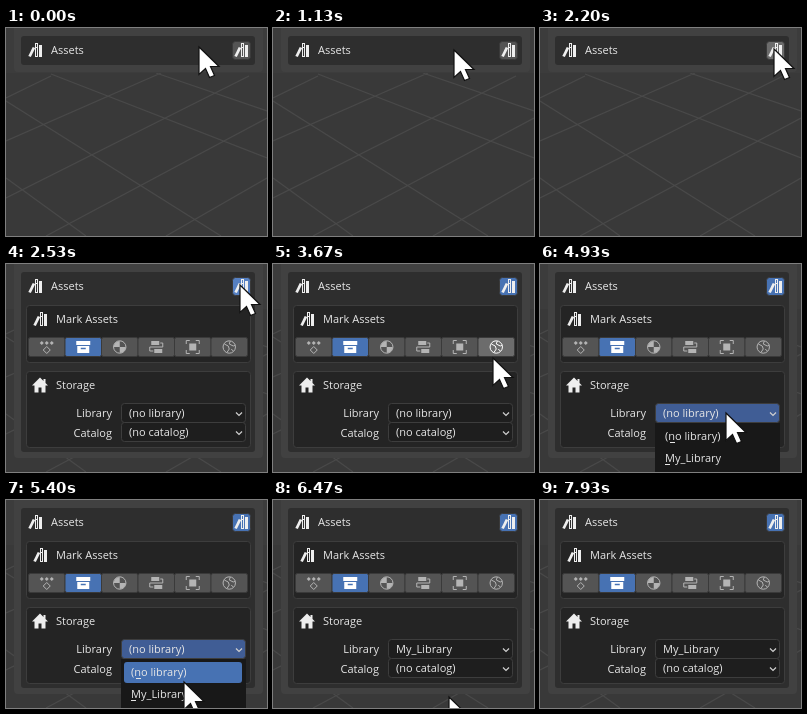
These frames come from a looping animation (261 by 208 pixels, 8.6 s). An HTML page:

```html
<!DOCTYPE html>
<html lang="en">
<head>
<meta charset="utf-8">
<title>Assets panel</title>
<style>
  html, body { margin: 0; width: 100%; height: 100%; overflow: hidden; background: #393939; }
  svg { display: block; width: 100vw; height: 100vh; }
  text { font: 11px "Open Sans", "Noto Sans", sans-serif; fill: #e6e6e6; }
  .end { text-anchor: end; }
  .grid { stroke: #494949; stroke-width: 1.2; fill: none; }
  .box { fill: #242424; stroke: #3d3d3d; }
  .field { fill: #1e1e1e; stroke: #3d3d3d; }
  .field.hover { fill: #282828; }
  .field.open { fill: #405d95; }
  .picked { fill: #4772b3; }
  .button { fill: #545454; stroke: #3a3a3a; }
  .button.hover { fill: #6c6c6c; }
  .button.on { fill: #4772b3; }
  .button.on.hover { fill: #5680c2; }
  .icon { fill: none; stroke: #b4b4b4; }
  .icon .solid { fill: #b4b4b4; stroke: none; }
  .icon.lit { stroke: #fff; }
  .icon.lit .solid { fill: #fff; }
  .chevron { fill: none; stroke: #d0d0d0; stroke-width: 1.2; }
</style>
</head>
<body>
<svg viewBox="0 0 261 208" xmlns="http://www.w3.org/2000/svg">
  <defs>
    <g id="books">
      <path d="M1.6 13.5 6 4.5" stroke="#eee" stroke-width="2.8"/>
      <rect x="7.5" y=".5" width="2" height="13" fill="none" stroke="#eee"/>
      <path d="M7 4.5h3" stroke="#eee"/>
      <rect x="11" y="2" width="3" height="12" fill="#eee"/>
    </g>
    <path id="chevron" class="chevron" d="M-3-1.5 0 1.5 3-1.5"/>
  </defs>

  <rect width="261" height="208" fill="#393939"/>
  <path class="grid" d="M0 70 45 48M0 113 155 45M0 170 243 48M40 208 261 90M160 208 261 150
    M0 73 215 208M45 46 261 130M150 45 261 83M0 150 80 208"/>
  <path d="M0 0H261V45H0Z" fill="#3c3c3c"/>
  <rect id="region" x="8" y="-8" width="249" rx="4" fill="#414141"/>
  <rect id="panel" x="15" y="8" width="234" rx="3" fill="#2e2e2e"/>
  <use href="#books" x="22" y="15"/>
  <text x="45" y="26">Assets</text>
  <rect id="toggle" class="button" x="226.5" y="13.5" width="18" height="18" rx="3"/>
  <use href="#books" x="228" y="15"/>

  <g id="details">
    <rect class="box" x="20.5" y="41.5" width="224" height="57" rx="3"/>
    <use href="#books" x="27" y="48"/>
    <text x="50" y="59">Mark Assets</text>
    <g id="tabs"></g>

    <rect class="box" x="20.5" y="107.5" width="224" height="76" rx="3"/>
    <path d="M34 113.5 26 121.5H28.5V128.5H32.5V123.5H35.5V128.5H39.5V121.5H42L39.5 119V115H37.5V117Z" fill="#eee"/>
    <text x="50" y="125">Storage</text>
    <text class="end" x="106" y="153">Library</text>
    <text class="end" x="106" y="173">Catalog</text>
    <rect id="catalog" class="field" x="115.5" y="158.5" width="124" height="19" rx="3"/>
    <rect id="library" class="field" x="115.5" y="139.5" width="124" height="19" rx="3"/>
    <text id="choice" x="123" y="153"></text>
    <text x="123" y="172">(no catalog)</text>
    <use href="#chevron" x="233" y="150"/>
    <use href="#chevron" x="233" y="169"/>
  </g>

  <g id="menu">
    <rect x="115" y="159" width="125" height="52" fill="#181818"/>
    <rect id="mark" class="picked" x="118" width="118" height="21" rx="3"/>
    <text x="125" y="176">(no library)</text>
    <text x="125" y="198">My_Library</text>
    <path d="M130 178.5h5M125 200.5h5" stroke="#e6e6e6"/>
  </g>

  <path id="cursor" d="M0 0V27.5L6.5 21.5 10.5 30.5 15.5 28.5 11.5 19.5H20Z"
    fill="#fff" stroke="#111" stroke-width="1.2"/>
</svg>

<script>
const LOOP = 8600, TICK = 1000 / 15;
const $ = id => document.getElementById(id);

// Each icon is drawn around its own centre.
const icons = [
  `<path class="solid" d="M-5-6 -3-4 -5-2 -7-4ZM5-6 7-4 5-2 3-4ZM0-6 2-4 0-2 -2-4Z"/>
   <path d="M0-.5 3.5 3 0 6.5 -3.5 3Z"/>`,
  `<path class="solid" d="M-7-6H7V-2H-7ZM-6-1H6V6H-6Z"/><path d="M-2.5 1.5H2.5" stroke="#4772b3" stroke-width="1.5"/>`,
  `<circle r="6.2"/><path class="solid" d="M0 0V-6A6 6 0 0 0-6 0ZM0 0V6A6 6 0 0 0 6 0Z"/>`,
  `<path class="solid" d="M-5-6H3V-2H-5ZM-2 2H6V6H-2Z"/><path d="M4-4H6.5V0H-6.5V4H-3"/>`,
  `<path d="M-6.5-3V-6.5H-3M3-6.5H6.5V-3M6.5 3V6.5H3M-3 6.5H-6.5V3"/><rect class="solid" x="-3.5" y="-3.5" width="7" height="7"/>`,
  `<circle r="6.2"/><path d="M-5-3 -1-1 0 2 -2 5M1-6 0-3 4-1 6-2M2 2 4 4"/>`
];
const pitch = 36.5;
$('tabs').innerHTML = icons.map((shape, i) => {
  const x = 22.5 + pitch * i, on = i === 1;
  return `<rect class="button ${on ? 'on' : ''}" x="${x}" y="73.5" width="${pitch}" height="19" rx="2"/>
    <g class="icon ${on ? 'lit' : ''}" transform="translate(${x + pitch / 2} 83)">${shape}</g>`;
}).join('');
const globe = $('tabs').lastElementChild;
const lastTab = globe.previousElementSibling;

// Moves: first tick, tick count, bend point, end point.
const start = [193, 19];
const moves = [
  [1, 5, [174, 20], [156, 22]],
  [13, 8, [178, 22], [194, 22]],
  [26, 8, [216, 22], [234, 21]],
  [50, 10, [240, 79], [187, 147]],
  [74, 10, [182, 155], [176, 197]],
  [112, 8, [136, 203], [96, 210]]
];

function cursorAt(tick) {
  let from = start;
  for (const [first, count, bend, to] of moves) {
    if (tick < first) break;
    const u = Math.min(1, (tick - first + 1) / count), v = 1 - u;
    from = from.map((a, i) => v * v * a + 2 * u * v * bend[i] + u * u * to[i]);
  }
  return from;
}

const show = (el, on) => el.style.display = on ? '' : 'none';
const flag = (el, name, on) => el.classList.toggle(name, on);

function draw(tick) {
  const [x, y] = cursorAt(tick);
  const over = (left, top, right, bottom) => x >= left && x < right && y >= top && y < bottom;
  const expanded = tick >= 38, pressed = tick >= 61 && tick < 97, menu = tick >= 63 && tick < 97;

  $('region').setAttribute('height', expanded ? 202 : 52);
  $('panel').setAttribute('height', expanded ? 180 : 29);
  show($('details'), expanded);
  flag($('toggle'), 'on', expanded);
  flag($('toggle'), 'hover', over(226, 13, 245, 32));

  const overTab = over(205, 74, 241, 96);
  flag(lastTab, 'hover', overTab);
  flag(globe, 'lit', overTab);
  flag($('library'), 'hover', over(115, 140, 240, 159));
  flag($('library'), 'open', pressed);
  $('choice').textContent = tick < 97 ? '(no library)' : 'My_Library';

  show($('menu'), menu);
  show($('mark'), y >= 161);
  $('mark').setAttribute('y', y < 183 ? 162 : 184);

  show($('cursor'), tick < 119);
  $('cursor').setAttribute('transform', `translate(${Math.round(x)} ${Math.round(y)})`);
}

const origin = performance.now();
function play() {
  const time = (performance.now() - origin) % LOOP;
  draw(Math.floor((time + 3.4) / TICK) % 129);
  requestAnimationFrame(play);
}
play();
</script>
</body>
</html>
```
